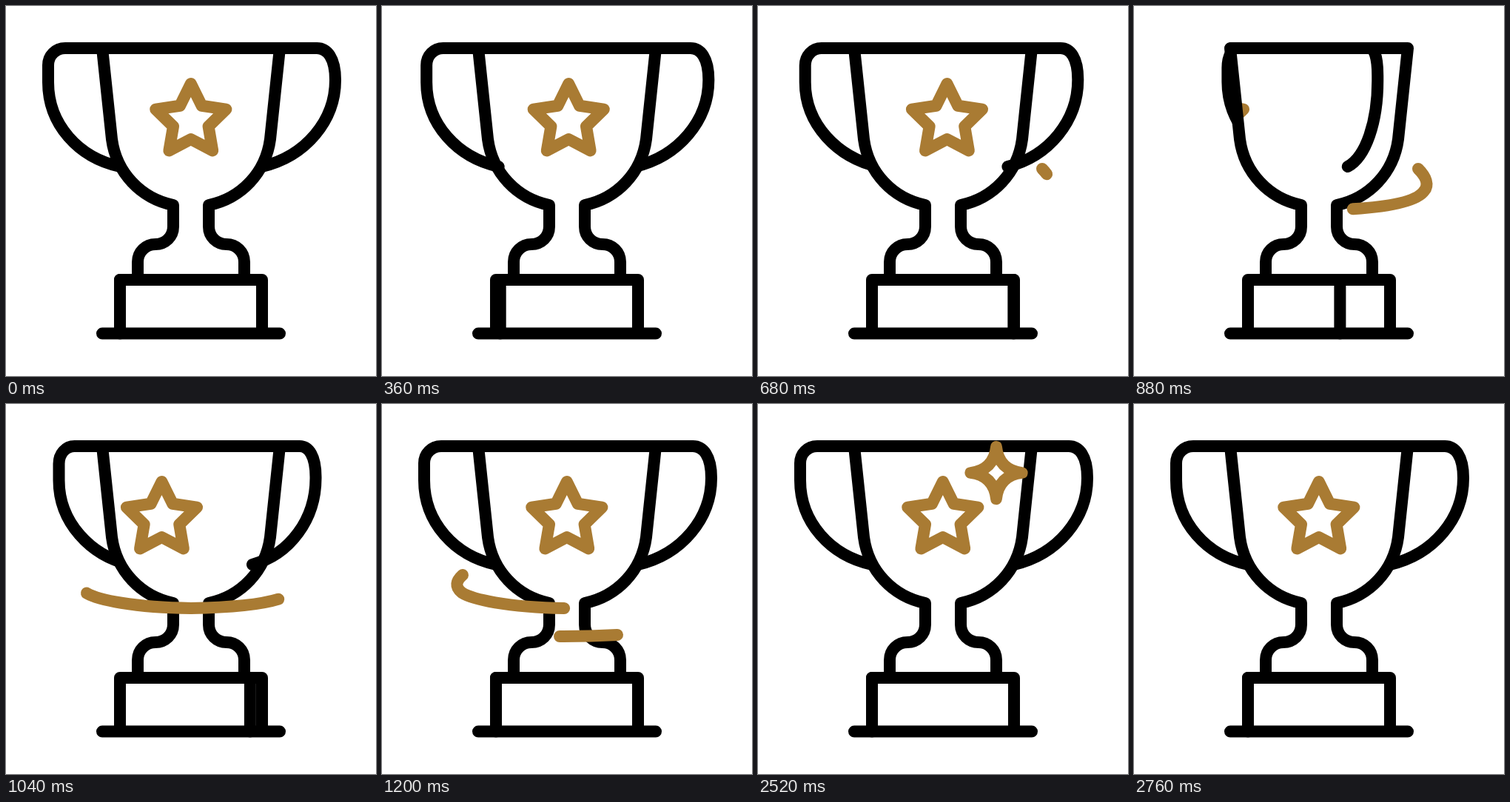
An HTML page that plays this animation: 500x500 px, repeating every 3000 ms.

```html
<!DOCTYPE html>
<html lang="en">
<head>
<meta charset="utf-8">
<title>Trophy</title>
<style>
  html, body { margin: 0; width: 100%; height: 100%; overflow: hidden; background: #fff; }
  svg { display: block; width: 100vw; height: 100vh; }
  path, line { fill: none; stroke: #000; stroke-width: 16; stroke-linecap: round; stroke-linejoin: round; }
  .gold { stroke: #a97b33; }
  .mask { fill: #fff; stroke: none; }
</style>
</head>
<body>
<svg viewBox="0 0 500 500">
  <defs>
    <clipPath id="bowl">
      <path d="M130 57H370L357 180C351 225 318 260 274 269H226C182 260 149 225 143 180Z"/>
    </clipPath>
  </defs>
  <path id="back"/>
  <path class="mask" d="M130 57H370L357 180C351 225 318 260 274 269H226C182 260 149 225 143 180Z"/>
  <g clip-path="url(#bowl)"><path id="star" class="gold"/></g>
  <path d="M178 370V346C178 332 189 322 202 322C215 322 226 312 226 298V269C182 260 149 225 143 180L130 57H370L357 180C351 225 318 260 274 269V298C274 312 285 322 298 322C311 322 322 332 322 346V370"/>
  <path d="M154 442.6V370H346V442.6M130 442.6H370"/>
  <line id="edge" y1="370" y2="442.6"/>
  <path id="front"/>
  <path id="upper" class="gold" pathLength="1" d="M384 220C395 231 399 242 392 250C378 270 310 275 250 276C170 275 122 264 108 255C98 247 100 239 109 231"/>
  <path id="lower" class="gold" pathLength="1" d="M318 312Q245 316 172 312"/>
  <path id="sparkle" class="gold" d="M0 -36Q3.5 -3.5 35.5 0Q3.5 3.5 0 36Q-3.5 3.5 -35.5 0Q-3.5 -3.5 0 -36Z"/>
</svg>
<script>
const LOOP = 3000, START = 300, HALF = 690, END = 1160, STAR_GAP = 320;
const $ = id => document.getElementById(id);
const clamp = v => Math.min(1, Math.max(0, v));
const mix = (a, b, k) => a + (b - a) * k;

// Monotone cubic curve through [time, value] keys, flat at both ends.
function track(...keys) {
  const slope = i => (keys[i + 1][1] - keys[i][1]) / (keys[i + 1][0] - keys[i][0]);
  const tangent = i => {
    if (i === 0 || i === keys.length - 1) return 0;
    const a = slope(i - 1), b = slope(i);
    return a * b > 0 ? 2 * a * b / (a + b) : 0;
  };
  return t => {
    if (t <= keys[0][0]) return keys[0][1];
    const i = keys.findIndex(k => k[0] > t) - 1;
    if (i < 0) return keys[keys.length - 1][1];
    const [t0, v0] = keys[i], [t1, v1] = keys[i + 1];
    const d = t1 - t0, s = (t - t0) / d, q = 1 - s;
    return v0 * (1 + 2 * s) * q * q + tangent(i) * d * s * q * q
         + v1 * s * s * (3 - 2 * s) - tangent(i + 1) * d * s * s * q;
  };
}

// Turn progress in half revolutions for each part.
const turn = (a, b, c) => track([START, 0], [520, a], [680, b], [HALF, 1], [880, c], [END, 2]);
const outerTurn = turn(.095, .963, 1.7);
const tipTurn = turn(.2, .95, 1.7);
const backTurn = turn(.11, .98, 1.82);
const edgeTurn = turn(.29, .996, 1.646);
const starShift = track([START, 0], [520, 28.5], [680, STAR_GAP + 4.5], [880, 2 * STAR_GAP - 150], [END, 2 * STAR_GAP]);

const upperHead = track([655, 0], [680, .025], [880, .38], [1100, 1]);
const upperTail = track([890, 0], [1200, .52], [1400, 1]);
const lowerHead = track([1100, 0], [1200, .53], [1360, 1]);
const lowerTail = track([1300, 0], [1420, .45], [1540, 1]);
const sparkleSize = track([1400, 0], [1640, 1], [2500, 1], [2755, 0]);

const LEFT = [[172, 57], [80, 57], [67, 57], [57, 67], [57, 80], [57, 103], [57, 160], [98, 205], [154, 217]];
const RIGHT = [[362, 57], [420, 57], [434, 57], [445, 70], [445, 100], [445, 100], [445, 155], [405, 203], [346, 217]];

// The inner ends may run ahead of the outer bend.
function handle(outer, ends) {
  const p = LEFT.map(([x, y], i) => {
    const k = i === 0 || i === 8 ? ends : i === 7 ? (outer + ends) / 2 : outer;
    return [mix(x, RIGHT[i][0], k), mix(y, RIGHT[i][1], k)].map(v => v.toFixed(2)).join(" ");
  });
  return `M${p[0]}L${p[1]}C${p[2]} ${p[3]} ${p[4]}L${p[5]}C${p[6]} ${p[7]} ${p[8]}`;
}

function trim(el, from, to) {
  el.style.display = to - from > .001 ? "" : "none";
  el.setAttribute("stroke-dasharray", `${Math.max(0, to - from)} 2`);
  el.setAttribute("stroke-dashoffset", -from);
}

$("star").setAttribute("d", "M" + Array.from({ length: 10 }, (_, i) => {
  const a = Math.PI * (i / 5 - .5), r = i % 2 ? 25 : 50;
  return `${249.8 + r * Math.cos(a)} ${155 + r * Math.sin(a)}`;
}).join("L") + "Z");

function draw(t) {
  const half = t < HALF ? 0 : t < END ? 1 : 2;
  const phase = part => clamp(part(t) - half);
  $("front").setAttribute("d", handle(phase(outerTurn), phase(tipTurn)));
  $("back").setAttribute("d", handle(1 - phase(backTurn), 1 - phase(tipTurn)));

  const x = 154 + 192 * phase(edgeTurn);
  $("edge").setAttribute("x1", x);
  $("edge").setAttribute("x2", x);

  const shift = (starShift(t) + STAR_GAP / 2) % STAR_GAP - STAR_GAP / 2;
  $("star").setAttribute("transform", `translate(${shift} 0)`);

  trim($("upper"), upperTail(t), upperHead(t));
  trim($("lower"), lowerTail(t), lowerHead(t));

  const size = sparkleSize(t);
  $("sparkle").style.display = size > .001 ? "" : "none";
  $("sparkle").setAttribute("transform", `translate(322 93) scale(${size})`);
}

const begin = performance.now();
function frame() {
  draw((performance.now() - begin) % LOOP);
  requestAnimationFrame(frame);
}
frame();
</script>
</body>
</html>
```
